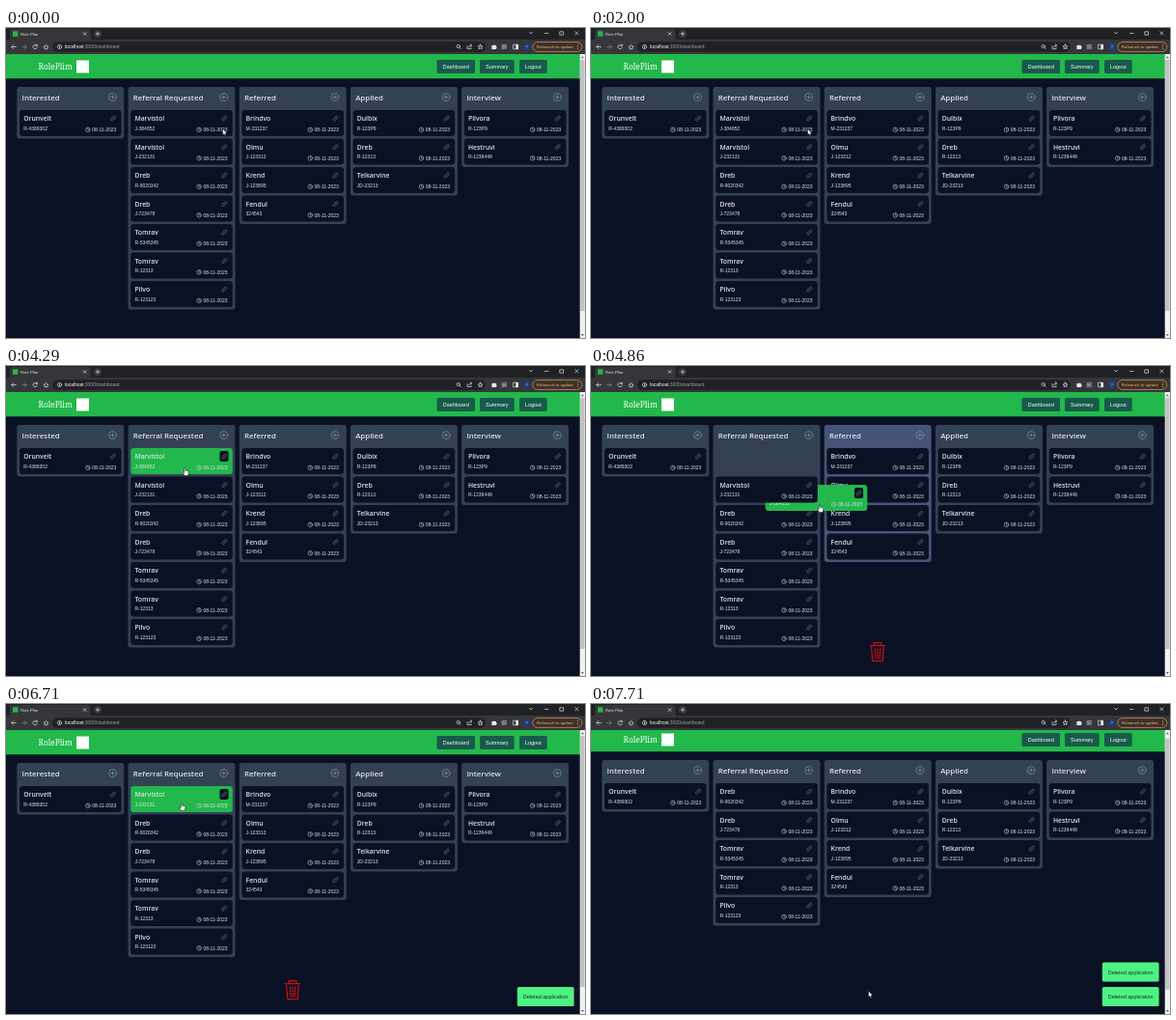
Animation of 600x321 px, one loop 8 s. Source, as an HTML page:

```html
<!DOCTYPE html>
<html lang="en">
<head>
<title>Role Plim</title>
<style>
  html, body { margin: 0; width: 100%; height: 100%; overflow: hidden; background: #0b1124; }
  svg { display: block; width: 100%; height: 100%; }
  text { font-family: "Liberation Sans", Arial, sans-serif; white-space: pre; }
  .head, .name { font-family: "Open Sans", "Noto Sans", sans-serif; font-weight: 600; fill: #dde3ec; }
  .head { font-size: 7.85px; }
  .name { font-size: 6.8px; }
  .small { font-size: 5px; fill: #e2e7ee; }
  .col { fill: #334155; }
  .col.over { fill: #465478; }
  .face { fill: #0b1124; }
  .pad { fill: none; }
  .hot .face { fill: #22b84b; }
  .hot .pad { fill: #0b1124; }
  .line { fill: none; stroke-linecap: round; stroke-linejoin: round; }
  .btn { font-size: 5.5px; fill: #fff; text-anchor: middle; }
</style>
</head>
<body>
<svg id="stage" viewBox="0 0 600 321">
  <rect width="600" height="321" fill="#0b1124"/>
  <g id="page">
    <rect y="20" width="595" height="32.3" fill="#22b84b"/>
    <text x="33.5" y="42.8" fill="#fff" style="font:8.3px 'Noto Serif',serif">RolePlim</text>
    <rect x="73" y="33.5" width="13" height="13" fill="#fff"/>
    <g id="buttons"></g>
    <g id="columns"></g>
    <g id="cards"></g>
  </g>
  <g id="trash" class="line" stroke="#e31212" stroke-width="1.2" stroke-dasharray="1.7 1.3">
    <path d="M289.3 289.6H304.7M293.2 289V286.6H300.8V289"/>
    <path d="M290.6 291L291.8 305.6H302.2L303.4 291"/>
    <path d="M294.4 293L294.9 303M297 293V303M299.6 293L299.1 303"/>
  </g>
  <g id="toasts"></g>

  <rect x="594.7" y="26" width="5.3" height="295" fill="#f1f1f1"/>
  <rect id="thumb" x="595.2" y="33" width="4.3" height="260" fill="#c1c1c1"/>
  <path d="M596 31.2L597.4 29.2L598.8 31.2ZM596 317L597.4 319L598.8 317Z" fill="#555"/>

  <g id="browser">
    <rect width="600" height="13" fill="#202124"/>
    <rect y="12" width="600" height="15" fill="#35363a"/>
    <path d="M2 12.5Q4 12.5 4 10V3.5Q4 1 6.5 1H85Q87.5 1 87.5 3.5V10Q87.5 12.5 89.5 12.5Z" fill="#35363a"/>
    <rect x="7" y="3.3" width="5.4" height="5.4" fill="#22b84b"/>
    <text x="15" y="7.6" font-size="4.3" fill="#e8eaed">Role Plim</text>
    <circle cx="95" cy="6" r="4.3" fill="#35363a"/>
    <rect x="48" y="14.3" width="449" height="10.4" rx="5.2" fill="#202124"/>
    <text x="61" y="21.2" font-size="4.95" fill="#9aa0a6"><tspan fill="#fff">localhost</tspan>:3000/dashboard</text>
    <g class="line" stroke="#dfe1e5" stroke-width=".7">
      <path d="M80.2 4.6L83 7.4M83 4.6L80.2 7.4M93.2 6H96.8M95 4.2V7.8"/>
      <path d="M542.4 4.4L544 6L545.6 4.4M558.4 5.4H562M574.2 3.8H577.6V7.2H574.2ZM589.8 3.7L593 6.9M593 3.7L589.8 6.9"/>
      <path d="M10.4 19.5H5.8M7.9 17.4L5.8 19.5L7.9 21.6"/>
      <path d="M16.7 19.5H21.2M19.1 17.4L21.2 19.5L19.1 21.6" stroke="#85888c"/>
      <path d="M32 18.2A2.2 2.2 0 1 0 32.3 20.2M32.3 17V18.5H30.8"/>
      <path d="M39.2 19.6L41.5 17.4L43.8 19.6M40 19.2V21.7H43V19.2"/>
      <circle cx="55.5" cy="19.5" r="2.1"/><path d="M55.5 19.4V20.6M55.5 18.3V18.4"/>
      <circle cx="468.6" cy="19" r="1.6"/><path d="M469.8 20.2L471.2 21.6"/>
      <path d="M478 18.6V21.6H482V20.2M479.4 19.8Q480 17.8 482.4 17.8M481.2 16.6L482.6 17.8L481.2 19"/>
      <path d="M491.5 17L492.2 18.8L494 18.9L492.6 20L493.1 21.8L491.5 20.8L489.9 21.8L490.4 20L489 18.9L490.8 18.8Z"/>
      <path d="M514 17.8H518.6M514 19.5H517M514 21.2H516.4M518 19.4V21.6"/>
      <rect x="526" y="17.2" width="4.6" height="4.6"/>
    </g>
    <path d="M503.4 18H505A.9 .9 0 0 1 506.7 18H508V19.4A.8 .8 0 0 1 508 21V22H503.4Z" fill="#e8eaed"/>
    <rect x="528.4" y="17.2" width="2.2" height="4.6" fill="#fff"/>
    <circle cx="539.6" cy="19.4" r="3.8" fill="#1d3f78"/>
    <text x="539.6" y="21" font-size="4.2" fill="#cfe0ff" text-anchor="middle">?</text>
    <rect x="545.8" y="14.6" width="51" height="9.8" rx="4.9" fill="#3c3029" stroke="#f2b06c" stroke-width=".6"/>
    <text x="549.8" y="21" font-size="4.4" fill="#f7b877">Relaunch to update</text>
    <path d="M592.6 17.2V17.3M592.6 19.4V19.5M592.6 21.6V21.7" class="line" stroke="#f7b877" stroke-width="1"/>
  </g>

  <g id="cursor" stroke="#000" stroke-width=".5" fill="#fff" stroke-linejoin="round">
    <path id="arrow" d="M0 0V6.6L1.5 5.3L2.5 7.5L3.5 7L2.5 4.9H4.6Z"/>
    <path id="hand" d="M-.7 .4Q0 -.5 .7 .4V2.7L3.4 3.3Q4 3.5 3.9 4.3L3.2 7.9H-.5L-2.3 5Q-2.3 4.1 -1.5 4.4L-.7 5Z"/>
  </g>
</svg>
<script>
const LOOP = 8000, STEP = 1000 / 7, PITCH = 29.5;
const DATE = '08-11-2023', DROP = [114, 197.5];
const BOARD = [
  ['Interested', 'Orunvelt R-4389302'],
  ['Referral Requested', 'Marvistol J-384852', 'Marvistol J-232131', 'Dreb R-9020342', 'Dreb J-723478',
    'Tomrav R-5345345', 'Tomrav R-12313', 'Pilvo R-123123'],
  ['Referred', 'Brindvo M-231237', 'Olmu J-123312', 'Krend J-123895', 'Fendul 324543'],
  ['Applied', 'Dulbix R-123P9', 'Dreb R-12313', 'Telkarvine JD-23213'],
  ['Interview', 'Plivora R-123P9', 'Hestruvi R-1239449']
];
// step, x, y of the pointer
const PATH = [
  [0, 224.5, 104.3], [24, 224.5, 104.3], [25, 465.5, 164.5], [27, 340, 132], [28, 262, 116], [29, 205, 107],
  [30, 185.5, 105.5], [31, 185.5, 105.5], [32, 190, 109], [33, 210, 122], [34, 237, 143.5], [35, 262, 190],
  [37, 291, 281], [39, 288, 294.5], [42, 288, 294.5], [43, 270, 262], [45, 200, 130], [46, 184, 106],
  [47, 182, 102.5], [48, 190, 128], [50, 265, 262], [51, 290, 294], [53, 287.5, 297], [56, 287.5, 297]
];
// the two deletions: card index, lift, drop and removal steps, grab point
const DRAGS = [
  { card: 0, lift: 31, drop: 39, gone: 41, grab: [185.5, 105.5] },
  { card: 1, lift: 47, drop: 51, gone: 53, grab: [182, 102.5] }
];

const $ = id => document.getElementById(id);
const show = (el, on) => { el.style.display = on ? '' : 'none'; };
const move = (el, x, y) => el.setAttribute('transform', `translate(${x} ${y})`);
function add(parent, tag, attrs, text) {
  const el = document.createElementNS('http://www.w3.org/2000/svg', tag);
  for (const k in attrs) el.setAttribute(k, attrs[k]);
  if (text) el.textContent = text;
  return parent.appendChild(el);
}

for (const [label, x, w] of [['Dashboard', 446.5, 39.5], ['Summary', 491, 35.7], ['Logout', 532, 28.7]]) {
  add($('buttons'), 'rect', { x, y: 33, width: w, height: 14, rx: 1.6, fill: '#175a4b' });
  add($('buttons'), 'text', { x: x + w / 2, y: 42, class: 'btn' }, label);
}

function makeCard(spec) {
  const [name, code] = spec.split(' ');
  const g = add($('cards'), 'g');
  add(g, 'rect', { width: 105.6, height: 27, rx: 3.2, class: 'face' });
  add(g, 'rect', { x: 92.2, y: 3, width: 9.2, height: 11, rx: 2, class: 'pad' });
  add(g, 'text', { x: 4.2, y: 11.1, class: 'name' }, name);
  add(g, 'text', { x: 4.2, y: 20.9, class: 'small' }, code);
  const icons = add(g, 'g', { class: 'line', 'stroke-width': .6 });
  add(icons, 'path', { d: 'M96 9.6L98 7.6M96.2 7.7L97.3 6.5A1.3 1.3 0 0 1 99.2 8.4L98.1 9.6M97.8 9.7L96.7 10.8A1.3 1.3 0 0 1 94.8 8.9L95.9 7.8', stroke: '#66738a' });
  add(icons, 'path', { d: 'M73.2 20.3A2.3 2.3 0 1 1 68.6 20.3A2.3 2.3 0 1 1 73.2 20.3M70.9 18.9V20.4L71.9 20.9', stroke: '#c3cad5' });
  add(g, 'text', { x: 75.2, y: 22.1, class: 'small' }, DATE);
  return g;
}

const columns = BOARD.map(([title, ...specs], i) => {
  const x = 11.3 + 115.2 * i;
  const box = add($('columns'), 'rect', { x, y: 61, width: 111, rx: 3, class: 'col' });
  add($('columns'), 'text', { x: x + 5.3, y: 74.7, class: 'head' }, title);
  add($('columns'), 'path', {
    d: `M${x + 103.2} 71.6a4 4 0 1 1 -8 0a4 4 0 1 1 8 0M${x + 97.3} 71.6h3.8M${x + 99.2} 69.7v3.8`,
    class: 'line', stroke: '#8f9bad', 'stroke-width': .6
  });
  return { x, box, cards: specs.map(makeCard) };
});
const dragged = DRAGS.map(d => columns[1].cards[d.card]);
dragged.forEach(card => $('cards').append(card));

const toasts = DRAGS.map(() => {
  const g = add($('toasts'), 'g');
  add(g, 'rect', { width: 58.8, height: 20, rx: 1.6, fill: '#4df283' });
  add(g, 'text', { x: 29.4, y: 12, class: 'btn', style: 'fill:#123524' }, 'Deleted application');
  return g;
});

function pointer(k) {
  let i = 1;
  while (i < PATH.length - 1 && PATH[i][0] < k) i++;
  const [k0, x0, y0] = PATH[i - 1], [k1, x1, y1] = PATH[i];
  const f = Math.min(1, (k - k0) / (k1 - k0));
  return [x0 + (x1 - x0) * f, y0 + (y1 - y0) * f];
}

function render(t) {
  const k = Math.floor((t + 5) / STEP);
  const [px, py] = pointer(k);
  const scroll = k >= 50 ? 3 : 0;
  const drag = DRAGS.find(d => k >= d.lift && k < d.gone);
  const held = drag && k < drag.drop;
  let hand = held;

  columns.forEach((col, i) => {
    const live = col.cards.filter(c => {
      const n = dragged.indexOf(c), on = n < 0 || k < DRAGS[n].gone;
      show(c, on);
      return on;
    });
    const bottom = 85 + PITCH * live.length;
    col.box.setAttribute('height', bottom - 61);
    const over = held && k > drag.lift && py < bottom && Math.floor((px - 3) / 115.2) === i;
    col.box.classList.toggle('over', !!over);

    live.forEach((card, row) => {
      let x = col.x + 2.7, y = 85 + PITCH * row, hot = false;
      if (drag && card === columns[1].cards[drag.card]) {
        hot = held;
        x += held ? px - drag.grab[0] : DROP[0];
        y += held ? py - drag.grab[1] : DROP[1];
      } else if (!drag && k >= 25) {
        hot = px >= x && px <= x + 105.6 && py + scroll >= y && py + scroll <= y + 27;
      }
      hand = hand || hot;
      card.classList.toggle('hot', !!hot);
      move(card, x, y);
    });
  });

  move($('page'), 0, -scroll);
  $('thumb').setAttribute('y', 33 + scroll * .9);
  show($('trash'), drag);
  const count = DRAGS.filter(d => k >= d.gone).length;
  toasts.forEach((g, i) => {
    show(g, i < count);
    move(g, 529.8, 293 - 25.4 * i);
  });
  move($('cursor'), px, py);
  show($('hand'), hand);
  show($('arrow'), !hand);
}

const start = performance.now();
function tick() {
  render((performance.now() - start) % LOOP);
  requestAnimationFrame(tick);
}
tick();
</script>
</body>
</html>
```
